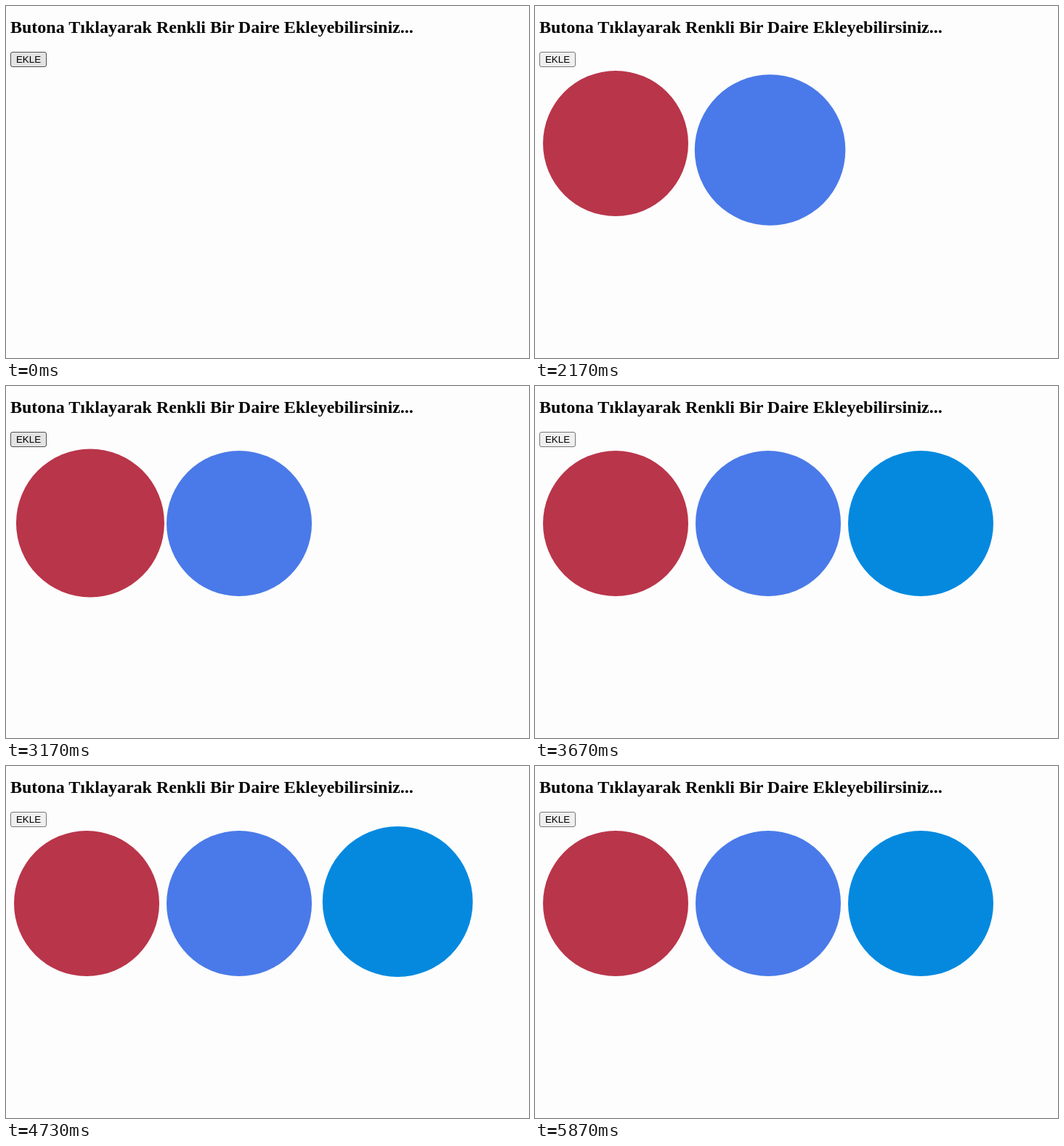
Animation of 720 by 484 pixels, one loop 5.91 s. Source, as an HTML page with a canvas:

```html
<!DOCTYPE html>
<html lang="tr">
<head>
<meta charset="utf-8">
<title>Daire Ekle</title>
<style>
  html, body { margin: 0; width: 100%; height: 100%; overflow: hidden; background: #fdfdfd; }
  h2 {
    position: absolute; left: 6px; top: 16px; margin: 0;
    font: bold 24px/27px "Liberation Serif", "Times New Roman", serif;
    color: #000; white-space: nowrap;
  }
  #add {
    position: absolute; left: 6px; top: 63px; width: 50px; height: 21px;
    box-sizing: border-box; border: 1px solid #767676; border-radius: 3px;
    background: #efefef; color: #000; text-align: center;
    font: 13.333px/19px "Liberation Sans", Arial, sans-serif;
  }
  #add.hover { background: #e3e3e3; border-color: #4f4f4f; }
  canvas { position: absolute; left: 0; top: 0; }
</style>
</head>
<body>
<h2>Butona Tıklayarak Renkli Bir Daire Ekleyebilirsiniz...</h2>
<div id="add">EKLE</div>
<canvas id="stage" width="720" height="484"></canvas>
<script>
const LOOP = 5910;
const RADIUS = 100, CENTER_Y = 189;
const SPIN = 0.00937, PULSE = 0.0122;   // rad per ms
const LAG = 80;                         // circles react this late to the pointer

const circles = [
  { x: 111, color: "#b9354a", born: 150, phase: 1.6 },
  { x: 321, color: "#4a7ae9", born: 970, phase: -0.2 },
  { x: 531, color: "#0489df", born: 3240, phase: -0.64 }
];

// Invisible pointer: time, x, y
const path = [
  [930, 31, 73], [1290, 216, 200], [1450, 300, 190], [2720, 270, 190],
  [2930, 120, 170], [3090, 65, 122], [3165, 31, 73], [3310, 31, 73],
  [3520, 150, 190], [3900, 500, 190], [5120, 500, 190],
  [5340, 150, 190], [5670, 540, 200], [5790, 590, 320]
];

const ctx = document.getElementById("stage").getContext("2d");
const button = document.getElementById("add");

function pointer(t) {
  const i = path.findIndex(p => p[0] > t);
  if (i === 0) return { x: path[0][1], y: path[0][2] };
  const a = path.at(i < 0 ? -1 : i - 1);
  const b = path.at(i);
  const k = i < 0 ? 0 : (t - a[0]) / (b[0] - a[0]);
  return { x: a[1] + (b[1] - a[1]) * k, y: a[2] + (b[2] - a[2]) * k };
}

function smooth(v) {
  v = Math.min(1, Math.max(0, v));
  return v * v * (3 - 2 * v);
}

// A circle under the pointer swells and swings round its resting place
function drawCircle(c, t, mouse) {
  const depth = RADIUS - Math.hypot(mouse.x - c.x, mouse.y - CENTER_Y);
  const grow = smooth(depth / 30) * (0.042 - 0.02 * Math.cos(PULSE * t));
  const angle = SPIN * t + c.phase;
  const shift = 250 * grow;
  ctx.fillStyle = c.color;
  ctx.beginPath();
  ctx.arc(c.x + shift * Math.cos(angle), CENTER_Y + shift * Math.sin(angle),
    RADIUS * (1 + grow), 0, 2 * Math.PI);
  ctx.fill();
}

function draw(t) {
  const late = pointer(t - LAG);
  ctx.clearRect(0, 0, 720, 484);
  for (const c of circles) if (t >= c.born) drawCircle(c, t, late);
  const now = pointer(t);
  button.className = now.x < 56 && now.y < 84 ? "hover" : "";
}

const begin = performance.now();
function tick() {
  draw((performance.now() - begin) % LOOP);
  requestAnimationFrame(tick);
}
tick();
</script>
</body>
</html>
```
